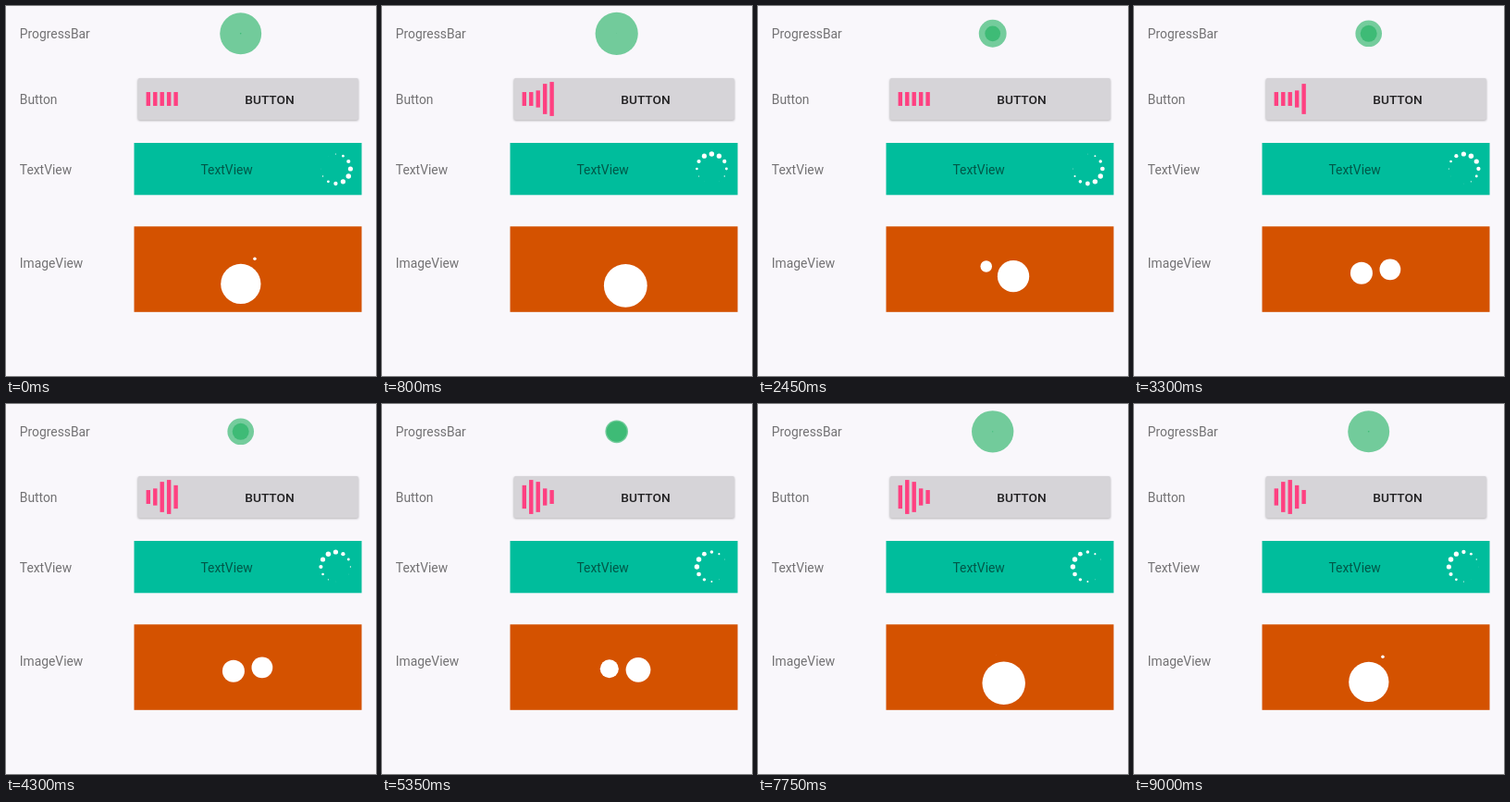
Write an HTML page that moves like this. It is 400 px wide and 400 px high and loops after 9050 ms.

```html
<!DOCTYPE html>
<html lang="en">
<head>
<meta charset="utf-8">
<title>Loading indicators</title>
<style>
  html, body { margin: 0; height: 100%; overflow: hidden; background: #f9f7fb; }
  svg { display: block; width: 100%; height: 100%; }
  text { font: 13.85px Roboto, sans-serif; fill: rgba(0, 0, 0, .54); }
  .caption { font-weight: 500; font-size: 13.7px; fill: #212022; text-anchor: middle; }
  .button { fill: #d6d4d8; filter: drop-shadow(0 1px 1px rgba(0, 0, 0, .28)); }
</style>
</head>
<body>
<svg id="stage" viewBox="0 0 400 400">
  <text x="14.8" y="35">ProgressBar</text>
  <text x="14.8" y="106">Button</text>
  <text x="14.8" y="181.5">TextView</text>
  <text x="14.8" y="283">ImageView</text>
  <rect class="button" x="142.5" y="78" width="238.5" height="45" rx="2"/>
  <text class="caption" x="285" y="105.7">BUTTON</text>
  <rect x="138.5" y="148" width="246" height="56.3" fill="#00bd9c"/>
  <text x="210.5" y="181.5">TextView</text>
  <rect x="138.5" y="238.3" width="246" height="92.5" fill="#d45200"/>
</svg>
<script>
const LOOP = 9050, STEP = 50;
const stage = document.getElementById('stage');

function add(tag, attrs) {
  const node = document.createElementNS(stage.namespaceURI, tag);
  set(node, attrs);
  return stage.appendChild(node);
}
function set(node, attrs) {
  for (const name in attrs) node.setAttribute(name, attrs[name]);
}
const many = (count, make) => Array.from({ length: count }, (_, i) => make(i));
const mod = (a, n) => ((a % n) + n) % n;

// cubic-bezier(.42, 0, .58, 1)
function easeInOut(x) {
  let low = 0, high = 1;
  for (let i = 0; i < 24; i++) {
    const s = (low + high) / 2;
    if (1.26 * s - 0.78 * s * s + 0.52 * s ** 3 < x) low = s; else high = s;
  }
  return low * low * (3 - 2 * low);
}

// Eased 0 -> 1 -> 0, reaching 1 at time `peak`
function pulse(t, peak, period) {
  const x = mod(t - peak, period) / period;
  return easeInOut(Math.abs(1 - 2 * x));
}

const bounces = many(2, () =>
  add('circle', { cx: 253.7, cy: 29.8, fill: '#1aaf5d', 'fill-opacity': 0.6 }));
const bars = many(5, i =>
  add('rect', { x: 151.6 + 7.45 * i, width: 4.4, fill: '#ff4081' }));
const ring = many(12, i => {
  const angle = (i / 12 - 0.25) * 2 * Math.PI;
  return add('circle', {
    cx: 356.4 + 16 * Math.cos(angle), cy: 176 + 16 * Math.sin(angle), fill: '#fff'
  });
});
const chasers = many(2, () => add('circle', { fill: '#fff' }));

function draw(t) {
  bounces.forEach((dot, i) =>
    set(dot, { r: 23.3 * pulse(t, 867 + 1000 * i, 2000) }));

  bars.forEach((bar, i) => {
    const x = mod(t + 1015 - 100 * i, 1200) / 240;
    const height = 37.3 * (0.4 + 0.6 * easeInOut(Math.max(0, 1 - Math.abs(1 - x))));
    set(bar, { y: 100.5 - height / 2, height });
  });

  ring.forEach((dot, i) =>
    set(dot, { r: 2.75 * pulse(t, 100 * i - 405, 1200) }));

  chasers.forEach((dot, i) => {
    const angle = (119 + 0.18 * t + 180 * i) * Math.PI / 180;
    set(dot, {
      cx: 261.4 + 15.6 * Math.cos(angle),
      cy: 286.8 + 15.6 * Math.sin(angle),
      r: 23.4 * pulse(t, 1808 + 1000 * i, 2000)
    });
  });
}

const start = performance.now();
function tick() {
  const t = (performance.now() - start) % LOOP;
  draw(Math.floor(t / STEP) * STEP);
  requestAnimationFrame(tick);
}
tick();
</script>
</body>
</html>
```
